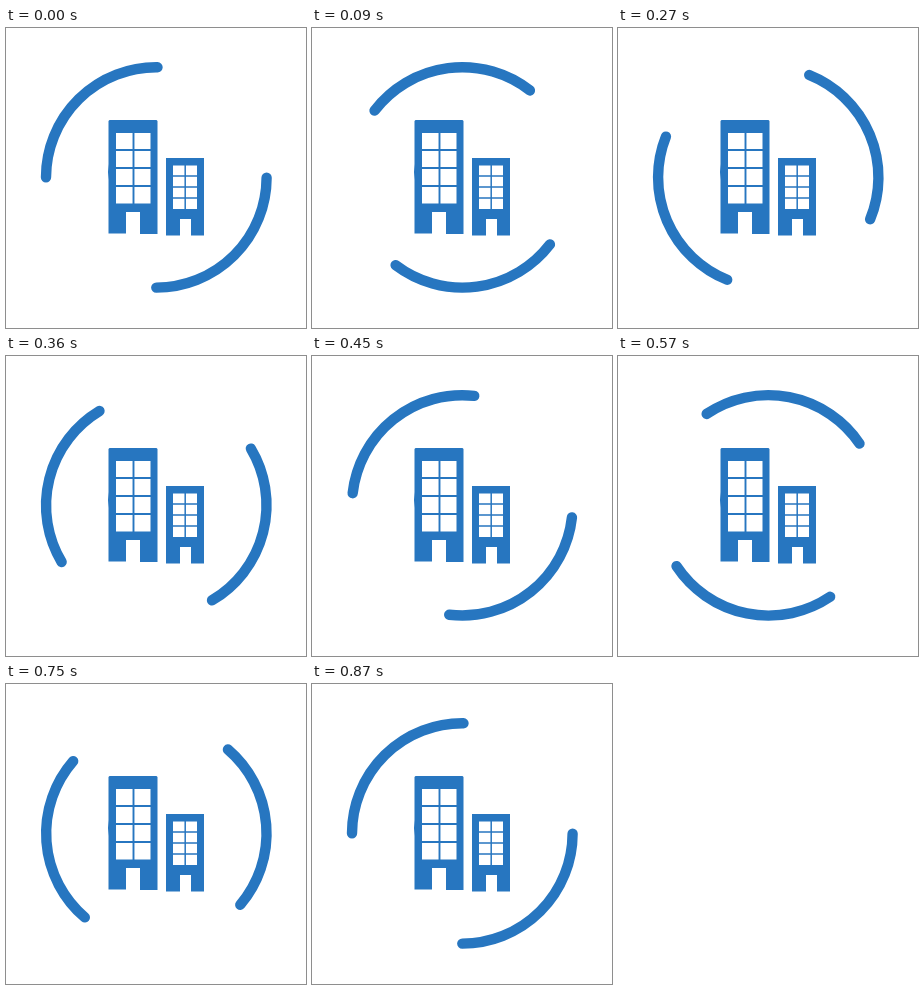
Write an HTML page that moves like this. It is 300 by 300 pixels and loops after 900 ms.

```html
<!DOCTYPE html>
<html lang="en">
<head>
<meta charset="utf-8">
<title>Buildings with rotating ring</title>
<style>
  html, body { margin: 0; width: 100%; height: 100%; overflow: hidden; background: #fff; }
  svg { display: block; width: 100%; height: 100%; }
</style>
</head>
<body>
<svg viewBox="0 0 300 300" fill="#2776c0" stroke="#2776c0">
  <g id="ring" fill="none" stroke-width="10.4" stroke-linecap="round">
    <path d="M40 149.3A110.3 110.3 0 0 1 151.5 39.3"/>
    <path d="M260.6 149.7A110.3 110.3 0 0 1 150.3 259.6"/>
  </g>
  <g stroke="none" fill-rule="evenodd">
    <path d="M103.5 92H150.5L151.5 93V206H134V184H120V205.5H102.5V152L102 144L102.5 136V93ZM110 105V175.5H144.5V105Z"/>
    <path d="M160 130H198V207.5H185V191H174V207.5H160ZM167 137.5V181H191V137.5Z"/>
  </g>
  <g fill="none">
    <path stroke-width="1.9" d="M127.5 105V176M110 122H145M110 140H145M110 158H145"/>
    <path stroke-width="1.5" d="M179.2 137V181M167 148H191M167 159H191M167 170H191"/>
  </g>
</svg>
<script>
  const STEP = 30, STEPS = 30;
  const ring = document.getElementById('ring');

  function draw() {
    const step = Math.floor(performance.now() / STEP) % STEPS;
    // The first and last steps share the same pose.
    const angle = step * 360 / (STEPS - 1);
    ring.setAttribute('transform', `rotate(${angle} 150.3 149.4)`);
    requestAnimationFrame(draw);
  }
  draw();
</script>
</body>
</html>
```
